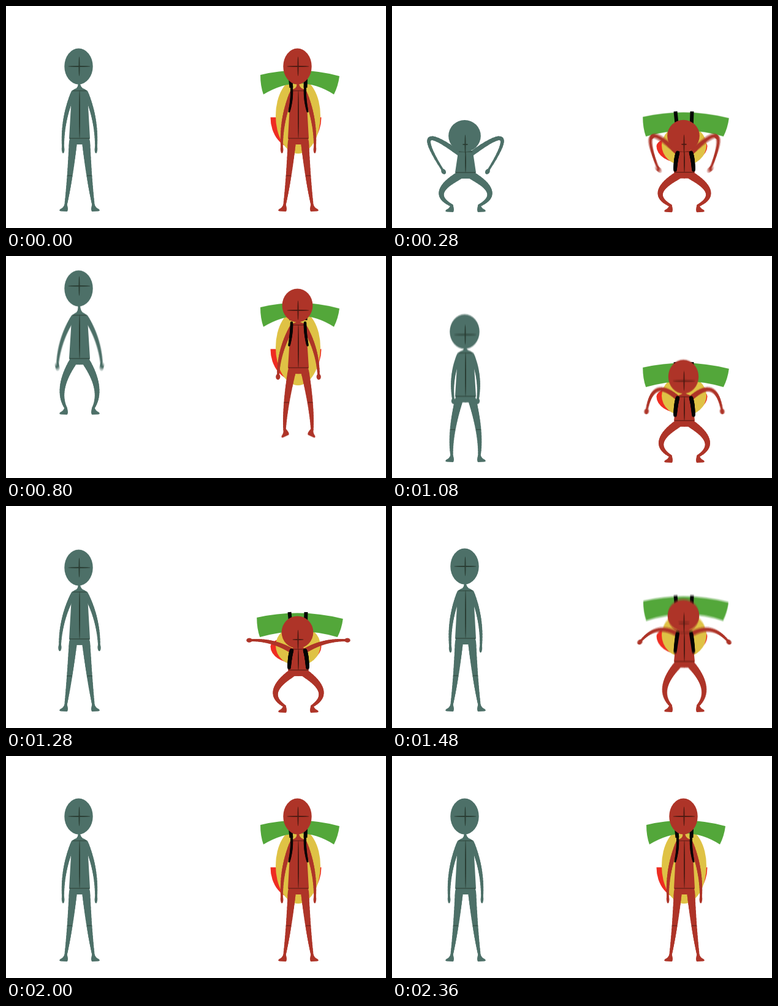
Recreate the animation shown at these times as an HTML page with a canvas. Size 620x364 px, loop 2400 ms.

```html
<!DOCTYPE html>
<html lang="en">
<head>
<meta charset="utf-8">
<title>Two jumps</title>
<style>
  html, body { margin: 0; width: 620px; height: 364px; overflow: hidden; background: #fff; }
  canvas { display: block; }
</style>
</head>
<body>
<canvas id="stage" width="620" height="364"></canvas>
<script>
const LOOP = 2400, STEP = 40, SHUTTER = 22, SAMPLES = 6;
const stage = document.getElementById('stage');
const out = stage.getContext('2d');
const buffer = document.createElement('canvas');
buffer.width = stage.width;
buffer.height = stage.height;
const g = buffer.getContext('2d');
const clamp = (x, lo = 0, hi = 1) => Math.min(hi, Math.max(lo, x));

// Pose: head y, shoulder y, hip y, wrist distance from the axis, wrist y, ankle y.
const stand = [99, 138, 217, 27, 231, 326];
const crouch = [213, 238, 273, 38, 268, 327];
const settle = [104, 144, 217, 29, 234, 326];

// Each key: time, then values.
const light = [
  [0, ...stand], [STEP, ...stand], [240, ...crouch], [360, ...crouch],
  [480, 82, 110, 184, 33, 164, 290],
  [640, 52, 93, 167, 46, 142, 262],
  [800, 53, 96, 168, 36, 177, 249],
  [1000, 136, 170, 239, 26, 245, 327],
  [1080, 124, 158, 230, 20, 234, 327],
  [1280, 101, 140, 218, 32, 228, 326],
  [1480, 99, 138, 217, 25, 230, 326],
  [1880, ...stand], [LOOP, ...stand]
];
const heavy = [
  [0, ...stand], [STEP, ...stand], [240, ...crouch],
  [480, 206, 231, 264, 84, 214, 328],
  [600, 150, 182, 241, 60, 235, 327],
  [680, 88, 124, 199, 33, 207, 308],
  [800, 81, 112, 183, 33, 194, 284],
  [900, 102, 138, 212, 38, 207, 326],
  [1080, 198, 230, 270, 61, 251, 328],
  [1280, 207, 234, 269, 76, 220, 328],
  [1480, 180, 207, 255, 70, 220, 327],
  [1640, ...settle], [1720, ...settle], [1960, ...stand], [LOOP, ...stand]
];

// Pack: roll y, bag bottom y.
const packUp = [113, 242], packLow = [183, 262], packMid = [156, 248];
const pack = [
  [0, ...packUp], [STEP, ...packUp], [240, ...packLow], [480, ...packMid],
  [680, 94, 222], [800, 84, 212],
  [1080, ...packLow], [1280, ...packLow], [1480, ...packMid],
  [1640, ...packUp], [LOOP, ...packUp]
];

// Monotone cubic interpolation through the keys.
function sample(track, t) {
  let i = 0;
  while (i < track.length - 2 && t >= track[i + 1][0]) i++;
  const a = track[i], b = track[i + 1], d = b[0] - a[0];
  const u = (t - a[0]) / d, v = 1 - u;
  return a.slice(1).map((from, n) => {
    const k = n + 1;
    const slope = j => j < 0 || j > track.length - 2 ? 0 :
      (track[j + 1][k] - track[j][k]) / (track[j + 1][0] - track[j][0]);
    const tangent = j => {
      const p = slope(j - 1), q = slope(j);
      return p * q > 0 ? 2 * p * q / (p + q) : 0;
    };
    return from * v * v * (1 + 2 * u) + b[k] * u * u * (3 - 2 * u)
      + d * u * v * (tangent(i) * v - tangent(i + 1) * u);
  });
}

function ellipse(x, y, rx, ry, turn = 0) {
  g.beginPath();
  g.ellipse(x, y, rx, ry, turn, 0, 7);
  g.fill();
}

function line(x0, y0, x1, y1, width) {
  g.lineWidth = width;
  g.beginPath();
  g.moveTo(x0, y0);
  g.lineTo(x1, y1);
  g.stroke();
}

// Tapered curve that passes through the middle joint.
function limb(x0, y0, x1, y1, x2, y2, w0, w1, w2) {
  const n = 18;
  const at = (p, q, r, u) => p * (1 - u) * (1 - 2 * u) + 4 * q * u * (1 - u) + r * u * (2 * u - 1);
  g.lineCap = 'round';
  for (let i = 0; i < n; i++) {
    const u = i / n, v = (i + 1) / n;
    line(at(x0, x1, x2, u), at(y0, y1, y2, u), at(x0, x1, x2, v), at(y0, y1, y2, v), at(w0, w1, w2, u));
  }
}

function drawArm(shoulderY, wristX, wristY, fist) {
  const x = 10, y = shoulderY + 4, dx = wristX - x, dy = wristY - y;
  const length = Math.hypot(dx, dy), bend = Math.max(5, (68 - length) * 1.7);
  const elbowX = x + dx / 2 + dy / length * bend;
  const elbowY = y + dy / 2 - dx / length * bend;
  limb(x, y, elbowX, elbowY, wristX, wristY, 8, 6, 3.5);
  const turn = Math.atan2(3 * wristY - 4 * elbowY + y, 3 * wristX - 4 * elbowX + x);
  ellipse(wristX + 4 * Math.cos(turn), wristY + 4 * Math.sin(turn),
    6.5 - 1.7 * fist, 2.3 + 1.3 * fist, turn);
}

function drawFoot(x, y, turn) {
  g.save();
  g.translate(x, y);
  g.rotate(turn);
  g.beginPath();
  g.moveTo(-2, -1);
  g.lineTo(2, -1);
  g.quadraticCurveTo(3, 4, 9, 7);
  g.quadraticCurveTo(12, 10, 8, 10.5);
  g.lineTo(-2, 11);
  g.quadraticCurveTo(-5, 9, -2, -1);
  g.fill();
  g.restore();
}

function drawFigure(c, [headY, sh, hip, wristX, wristY, ankleY], skin, ink) {
  const crossDy = 39 - (sh - headY);
  const headRy = 29.5 - .25 * Math.max(0, crossDy);
  const legTop = hip + 5, leg = ankleY - legTop, ankleX = 22.5;
  const kneeX = 16 + .42 * Math.max(0, 104 - leg), kneeY = legTop + .55 * leg;
  const fist = clamp((104 - leg) / 4);
  const footTurn = .6 * clamp((326 - ankleY) / 30) * clamp((leg - 76) / 25);

  g.save();
  g.translate(c, 0);
  for (const side of [-1, 1]) {
    g.save();
    g.scale(side, 1);
    g.fillStyle = g.strokeStyle = skin;
    drawArm(sh, wristX, wristY, fist);
    limb(10.5, legTop, kneeX, kneeY, ankleX, ankleY, 13, 8.5, 4);
    drawFoot(ankleX, ankleY, footTurn);

    // Half of the torso, overlapping the other half on the axis.
    g.beginPath();
    g.moveTo(-1, headY + headRy - 3);
    g.lineTo(2 - side, headY + headRy - 3);
    g.quadraticCurveTo(1, sh - 4, 8, sh - 2);
    g.quadraticCurveTo(13, sh, 13, sh + 8);
    g.lineTo(17, hip);
    g.lineTo(12, hip + 10);
    g.lineTo(-1, hip + 10);
    g.fill();

    if (kneeX < 27) {
      g.strokeStyle = ink;
      g.lineCap = 'butt';
      line(kneeX - 4, kneeY - 1, kneeX + 4, kneeY - 1, .8);
    }
    g.restore();
  }

  g.fillStyle = g.strokeStyle = ink;
  g.lineCap = 'butt';
  line(-11, sh + 1, 11, sh + 1, .9);
  line(-16, hip, 16, hip, 1);
  ellipse(0, (sh + hip) / 2, 1, (hip - sh) / 2);

  g.fillStyle = skin;
  ellipse(-1.5, headY, 685 / headRy, headRy);
  g.fillStyle = ink;
  ellipse(-.5, headY + crossDy, 18 * clamp(2 - crossDy / 8), 1);
  ellipse(-.5, headY + crossDy, 1, 16);
  g.restore();
}

function drawPack(c, [rollY, bottom], torso) {
  const squash = 58 * clamp((70 - torso) / 25), h = 124 - squash;
  const pocketY = bottom - h * .48;
  g.fillStyle = '#ee2d22';
  g.beginPath();
  g.ellipse(c - 4, pocketY, 41.5, h * .42, 0, 0, Math.PI);
  g.ellipse(c - 4, pocketY, 41.5, squash * .28, 0, Math.PI, 2 * Math.PI);
  g.fill();
  g.fillStyle = '#dfc245';
  ellipse(c - .5, bottom - h / 2, 36.5, h / 2);

  const m = c + 2.5, half = 64.5 + squash * .1, arch = 36 - squash * .3;
  g.fillStyle = '#53a73a';
  g.beginPath();
  g.moveTo(m - half, rollY);
  g.quadraticCurveTo(m, rollY - 16, m + half, rollY + 2);
  g.quadraticCurveTo(m + half - 2, rollY + 18, m + half - 9, rollY + 32);
  g.quadraticCurveTo(m, rollY + 32 - arch, m - half + 5, rollY + 32);
  g.quadraticCurveTo(m - half, rollY + 18, m - half, rollY);
  g.fill();
  g.strokeStyle = '#050505';
  g.lineCap = 'butt';
  for (const s of [-1, 1]) line(c + s * 13.5 - 1, rollY - 9, c + s * 11.5, rollY + 21, 6);
}

function drawShoulderStraps(c, sh, torso) {
  const short = clamp((79 - torso) / 40), w = 4 + 2.5 * short;
  g.strokeStyle = '#050505';
  for (const s of [-1, 1]) {
    limb(c + s * 11, sh - 4 + 7 * short, c + s * (11.5 + 2 * short), sh + 15,
      c + s * 15, sh + 35 - 4 * short, w, w, w - 1);
  }
}

function drawScene(t) {
  g.fillStyle = '#fff';
  g.fillRect(0, 0, stage.width, stage.height);
  drawFigure(120, sample(light, t), '#4d7068', '#2a3d33');
  const pose = sample(heavy, t), [, shoulderY, hipY] = pose, torso = hipY - shoulderY;
  drawPack(477, sample(pack, t), torso);
  drawFigure(477, pose, '#ae3428', '#4f1a12');
  drawShoulderStraps(477, shoulderY, torso);
}

const start = performance.now();

function frame() {
  const t = Math.floor((performance.now() - start) % LOOP / STEP) * STEP;
  // Average several moments for motion blur.
  for (let i = 0; i < SAMPLES; i++) {
    drawScene(Math.max(0, t + (i / (SAMPLES - 1) - .5) * SHUTTER));
    out.globalAlpha = 1 / (i + 1);
    out.drawImage(buffer, 0, 0);
  }
  requestAnimationFrame(frame);
}
frame();
</script>
</body>
</html>
```
